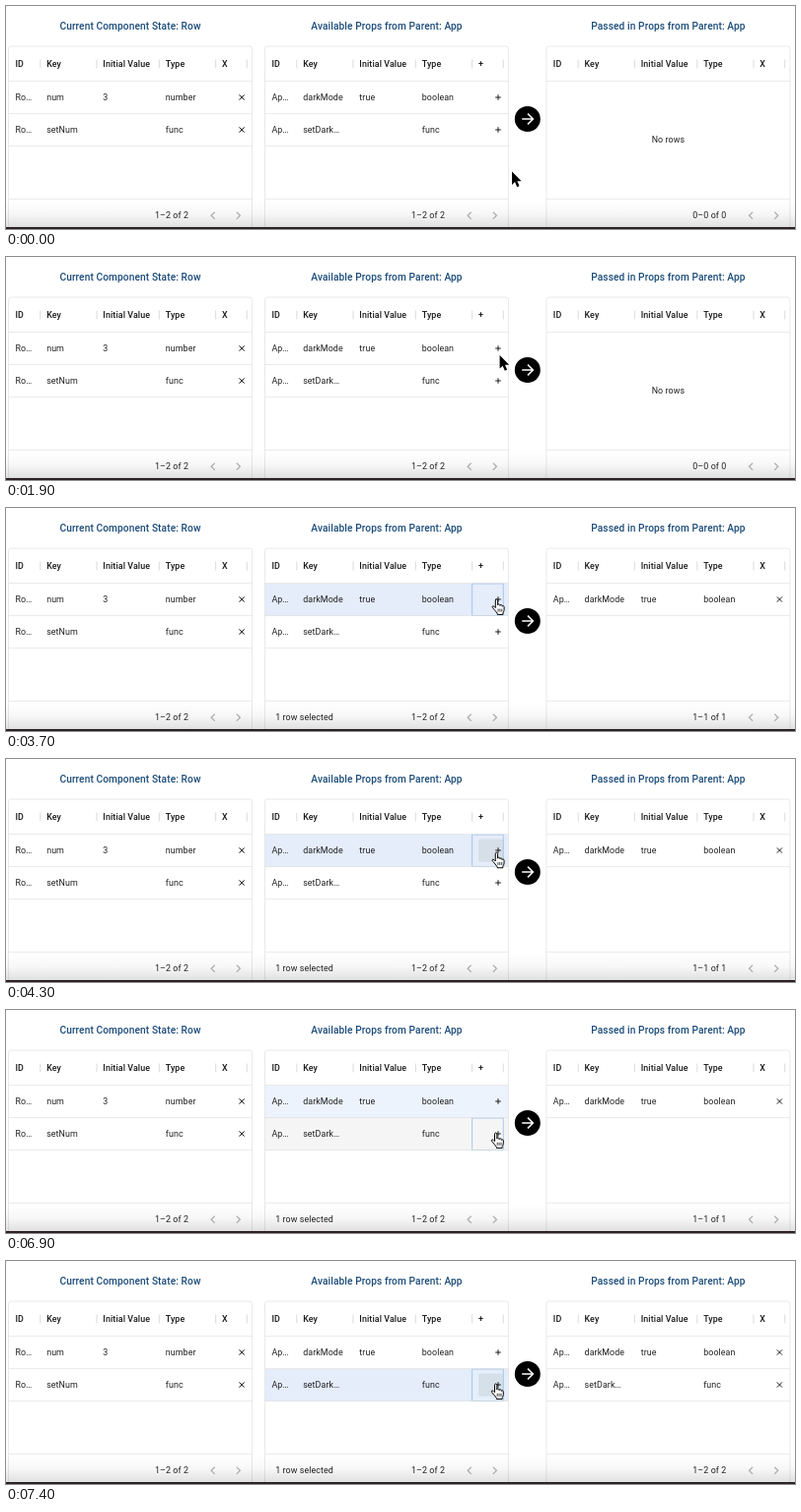
An HTML page for the animation above (8 s loop, 800 by 227 pixels).

```html
<!DOCTYPE html>
<html lang="en">
<head>
<meta charset="utf-8">
<style>
  html, body { margin: 0; width: 100%; height: 100%; overflow: hidden; background: #fff; }
  svg { display: block; width: 800px; height: 227px; }
  text { font: 400 8.89px Roboto, sans-serif; letter-spacing: .095px; fill: #212121; white-space: pre; }
  .head { font-weight: 500; fill: #1a1a1a; }
  .title { font-size: 10.16px; font-weight: 500; fill: #1c4c7a; }
  .mid { text-anchor: middle; }
  .end { text-anchor: end; }
  .line { fill: none; stroke: #e0e0e0; stroke-width: .7; }
  .icon { fill: none; stroke: #111; stroke-width: .95; }
  .page { fill: none; stroke: #b4b4b4; stroke-width: 1.25; }
</style>
</head>
<body>
<svg viewBox="0 0 800 227">
  <defs>
    <linearGradient id="shade" x2="0" y2="1">
      <stop offset="0" stop-opacity="0"/>
      <stop offset=".5" stop-opacity=".03"/>
      <stop offset="1" stop-opacity=".12"/>
    </linearGradient>
  </defs>
  <g id="scene"></g>
</svg>
<script>
const LOOP = 8000, STEP = 100;
const COLS = [3.1, 34.8, 92, 155.4, 212.6, 244.3];
const ROW_TOP = [76.8, 109.8], ROW_H = 33;
const HOVER = '#f5f5f5', SELECTED = '#edf3fc', ACTIVE = '#e5ecfa';
const PLUS = 'm-2.8 0h5.6m-2.8-2.8v5.6', CROSS = 'm-2.6-2.6l5.2 5.2m0-5.2l-5.2 5.2';

// Pointer stops: time, x, y
const PATH = [
  [0, 513, 168.5], [1100, 513, 168.5], [1400, 495.5, 163], [2000, 501, 95],
  [2300, 498, 93], [3000, 498, 93], [3100, 497.6, 93], [4200, 497.6, 93],
  [4800, 496.8, 125.2], [LOOP, 496.8, 125.2]
];

const text = (x, y, s, cls = '') => `<text x="${x}" y="${y}" class="${cls}">${s}</text>`;
const path = (d, cls) => `<path d="${d}" class="${cls}"/>`;
const rect = (x, y, w, h, fill, more = '') =>
  `<rect x="${x}" y="${y}" width="${w}" height="${h}" fill="${fill}" ${more}/>`;

function pointerAt(t) {
  const i = PATH.findIndex(p => p[0] > t);
  const [t0, x0, y0] = PATH[i - 1], [t1, x1, y1] = PATH[i];
  const u = (t - t0) / (t1 - t0), k = u * u * (3 - 2 * u);
  return [x0 + (x1 - x0) * k, y0 + (y1 - y0) * k];
}

function panel({ x, title, mark, rows, icon, count, fills = [], note = '', extra = '' }) {
  let s = text(123.5 + 2.5, 23.6, title, 'title mid');
  fills.forEach((f, i) => { if (f) s += rect(2.6, ROW_TOP[i], 246.8, ROW_H, f); });
  s += extra;
  ['ID', 'Key', 'Initial Value', 'Type', mark].forEach((h, i) => {
    s += text(COLS[i] + 6.35, 62, h, 'head') +
      rect(COLS[i + 1] - .6, 54.5, 1.2, 8.9, '#e0e0e0');
  });
  rows.forEach((cells, r) => {
    const y = 93 + 33 * r;
    cells.forEach((c, i) => { s += text(COLS[i] + 6.35, y + 3.2, c); });
    s += path(`M239 ${y}${icon}`, 'icon') + path(`M2.5 ${y + 16.6}H249.5`, 'line');
  });
  if (!rows.length) s += text(126, 139.4, 'No rows', 'mid');
  s += text(13.2, 216.4, note) + text(185, 216.4, count, 'end') +
    path('M211.7 209.7l-3.6 3.6l3.6 3.6M233.8 209.7l3.6 3.6l-3.6 3.6', 'page') +
    path('M2.5 76.6H249.5M2.5 196.6H249.5', 'line') +
    '<rect x="2.5" y="41" width="247" height="200" rx="2.5" class="line"/>';
  return `<g transform="translate(${x})">${s}</g>`;
}

function ripple(age, row) {
  if (age <= 0) return '';
  const y = ROW_TOP[row] + 4.8, r = 6 + 22 * Math.min(1, age / 300);
  return `<clipPath id="btn">${rect(219, y, 25.3, 23.2, '#000', 'rx="2.5"')}</clipPath>` +
    `<circle cx="239" cy="${y + 11.6}" r="${r}" fill="#c8d2d8" opacity=".5" clip-path="url(#btn)"/>`;
}

function pointer(x, y, hand) {
  return `<g transform="translate(${x} ${y})" stroke-linejoin="round">` + (hand
    ? `<path d="M-1.3 1C-1.3-.6 1-.6 1 1V5.8C1 4.5 3.2 4.5 3.3 5.9V6.4C3.4 5.2 5.5 5.3 5.5 6.7V7.2
        C5.7 6.2 7.5 6.4 7.5 7.8V10.6C7.5 12.3 6.5 12.9 6.3 14V15.4H.6V14.3C-.7 12.6-2.2 10.6-3.9 8.8
        C-5.3 7.2-3.9 6.2-2.7 7.2L-1.3 8.6Z" fill="#fff" stroke="#000"/>
       <path d="M1.4 9.6v3M3.3 9.6v3M5.2 9.6v3" stroke="#000" stroke-width=".75"/>`
    : `<path d="M0 0V13.4L3 10.6L5.2 15.7L7.5 14.7L5.4 9.7H9.6Z"
        stroke="#fff" stroke-width="1.6" paint-order="stroke"/>`) + '</g>';
}

function scene(t) {
  const [x, y] = pointerAt(t), hand = t >= 3100, over = !hand ? -1 : y < 109.5 ? 0 : 1;
  const picked = t < 3700 ? -1 : t < 7000 ? 0 : 1;
  const focus = t < 3700 ? -1 : t < 6900 ? 0 : 1;
  const fills = [0, 1].map(r => r === picked ? (r === over ? ACTIVE : SELECTED) : r === over ? HOVER : '');
  const props = [['Ap…', 'darkMode', 'true', 'boolean'], ['Ap…', 'setDark…', '', 'func']];
  const passed = picked + 1;

  let cell = '';
  if (focus >= 0) {
    const lit = picked === 1 ? '#e4effb' : 'none';
    cell = rect(212.7, ROW_TOP[focus] + .2, 31.5, 32.4, lit);
    if (over === picked) cell += ripple(t - (picked ? 6900 : 3700), picked);
    cell += rect(212.7, ROW_TOP[focus] + .2, 31.5, 32.4, 'none', 'stroke="#8dbae6" stroke-width=".75"');
  }

  return panel({
    x: 0, title: 'Current Component State: Row', mark: 'X', icon: CROSS, count: '1–2 of 2',
    rows: [['Ro…', 'num', '3', 'number'], ['Ro…', 'setNum', '', 'func']]
  }) + panel({
    x: 260, title: 'Available Props from Parent: App', mark: '+', icon: PLUS, count: '1–2 of 2',
    rows: props, fills, extra: cell, note: passed ? '1 row selected' : ''
  }) + panel({
    x: 545.4, title: 'Passed in Props from Parent: App', mark: 'X', icon: CROSS,
    rows: props.slice(0, passed), count: passed ? `1–${passed} of ${passed}` : '0–0 of 0'
  }) +
  '<circle cx="528.8" cy="115" r="13"/>' +
  '<path d="M523.2 115H534.2M529 109.6l5.4 5.4l-5.4 5.4" fill="none" stroke="#fff" stroke-width="1.5"/>' +
  rect(0, 198, 800, 27, 'url(#shade)') + rect(0, 225, 800, 2, '#2c2223') +
  pointer(x, y, hand);
}

const stage = document.getElementById('scene');
let last = -1;
function tick() {
  const t = Math.floor(performance.now() % LOOP / STEP) * STEP;
  if (t !== last) stage.innerHTML = scene(last = t);
  requestAnimationFrame(tick);
}
tick();
</script>
</body>
</html>
```
